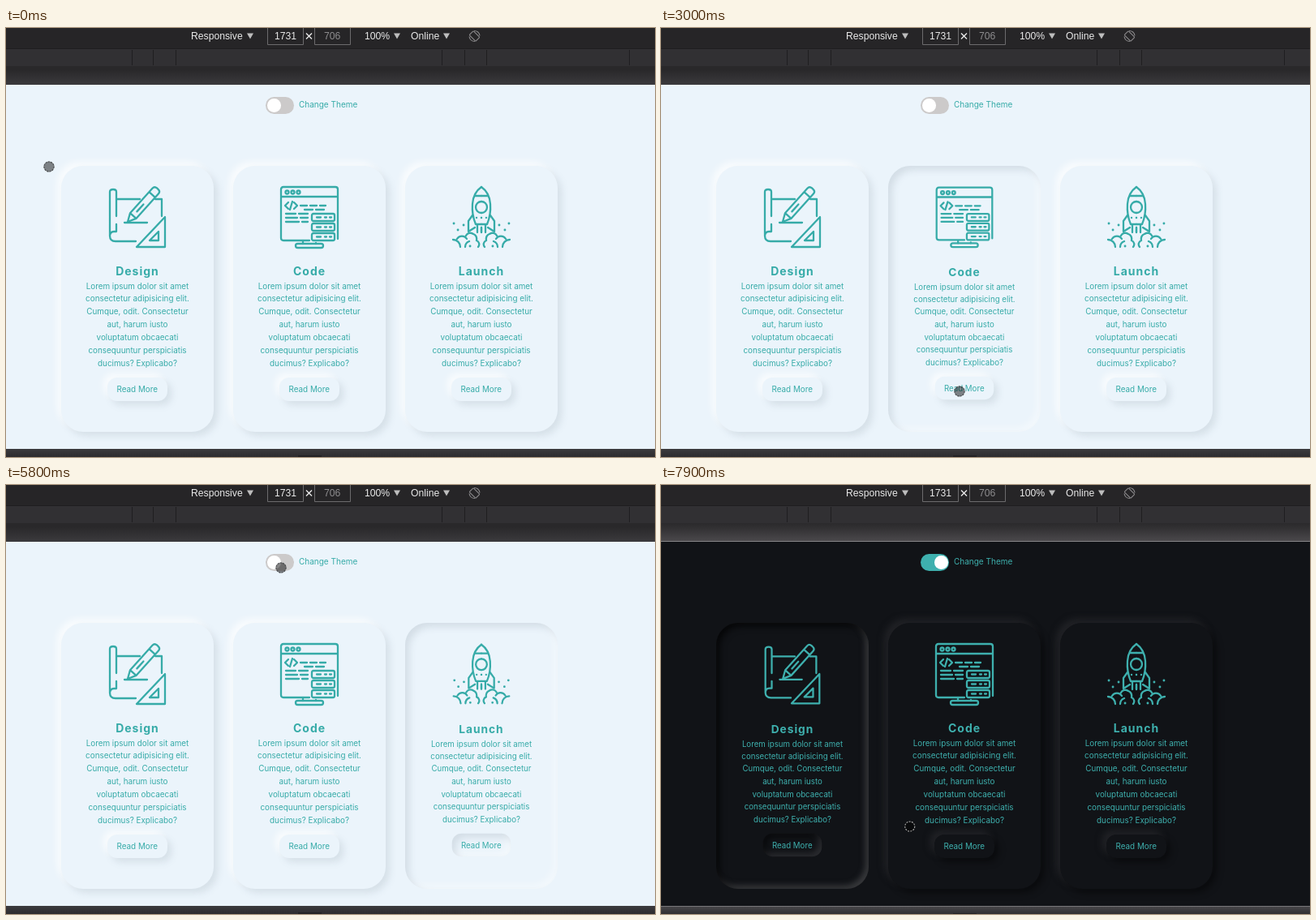
Recreate the animation shown at these times as an HTML page. Size 800 by 529 pixels, loop 8 s.

```html
<!DOCTYPE html>
<html lang="en">
<head>
<meta charset="utf-8">
<title>Theme cards</title>
<style>
html, body { margin: 0; width: 100%; height: 100%; overflow: hidden; background: #29282a; }
#stage {
  --bg: #ebf4fb; --ink: #36aba8; --ring: #4c4e50;
  --out: 5px 5px 9px rgba(110,128,142,.17), -5px -5px 9px rgba(255,255,255,.7);
  --in: inset 5px 5px 9px rgba(110,128,142,.19), inset -5px -5px 9px rgba(255,255,255,.4);
  --press: var(--in);
  position: relative; width: 800px; height: 529px; overflow: hidden;
  font: 9.9px/15.9px Inter, sans-serif; color: var(--ink);
}
#stage.dark {
  --bg: #111317; --ink: #3eb0ae; --ring: #a4a4a4;
  --out: 5px 5px 9px rgba(0,0,0,.4), -5px -5px 9px rgba(50,50,53,.5);
  --in: inset 4px 4px 9px rgba(0,0,0,.7), inset -4px -4px 7px #3a3b3e;
  --press: inset 4px 4px 8px rgba(0,0,0,.45), inset -4px -4px 8px #2b2c30;
}
#stage * { box-sizing: border-box; }
#stage > *, .card > *, .copy > * { position: absolute; }
svg { overflow: visible; }
#bar { left: 0; top: 0; font-family: "Liberation Sans", Arial, sans-serif; }
.edge { left: 0; width: 800px; }
.upper { top: 47px; height: 23px; background: linear-gradient(#29282a, #29282a 20%, #3b3a3d); }
.lower { top: 519px; height: 10px; background: linear-gradient(#3c3b3e, #2d2c2f); }
.lower::after { content: ""; position: absolute; left: 360px; top: 8px; width: 29px; height: 2px; background: #222124; }
.dark .upper { background: linear-gradient(#2b2a2c, #313032 25%, #4a484b); border-bottom: 1px solid #858487; }
.dark .lower { background: linear-gradient(#474649, #302f32); border-top: 1px solid #777679; }
#page { left: 0; top: 70px; width: 800px; height: 449px; background: var(--bg); }
#toggle { left: 320px; top: 84.5px; width: 35px; height: 21.5px; }
#track, #tint { position: absolute; inset: 0; }
#track { border-radius: 11px; }
#knob { position: absolute; left: 2px; top: 2.5px; width: 16.5px; height: 16.5px; border-radius: 50%; background: #fff; }
#tint { background: rgba(50,180,200,.38); }
#label { left: 361px; top: 87px; font-size: 10px; white-space: nowrap; }
.card { top: 170px; width: 188px; height: 327.5px; border-radius: 27px; box-shadow: var(--out); }
.card.on { box-shadow: var(--in); }
.card svg { left: 58px; top: 24px; fill: none; stroke: var(--ink); stroke-width: 2.3; stroke-linecap: round; stroke-linejoin: round; }
.copy { left: 0; top: 118px; width: 188px; height: 172px; text-align: center; }
.on svg, .on .copy { transform: scale(.98); }
h3 { margin: 0; top: 4px; width: 100%; font-size: 14px; letter-spacing: 1px; }
p { margin: 0; top: 22.5px; width: 100%; white-space: pre; }
.btn { left: 57px; top: 143px; width: 73.5px; height: 29px; border-radius: 12px; line-height: 29px; box-shadow: var(--out); }
.btn.pressed { box-shadow: var(--press); }
#cursor { left: -7px; top: -7px; width: 14px; height: 14px; }
</style>
</head>
<body>
<div id="stage">
  <svg id="bar" width="800" height="47" font-size="12.2" fill="#e9e9e9">
    <rect width="800" height="26" fill="#262527"/>
    <rect y="25" width="800" height="22" fill="#313033"/>
    <path d="M0 25.5H800M155.5 27v19M181.5 27v19M209.5 27v19M537.5 27v19M565.5 27v19M592.5 27v19M768.5 27v19" stroke="#1f1e20"/>
    <path d="M322.5-1V20.5H366.5V-1M380.5-1V20.5H424.5V-1" fill="none" stroke="#6c6b6d"/>
    <path d="M297 6.5h8l-4 7zM478 6.5h8l-4 7zM539 6.5h8l-4 7z" fill="#bdbdbd"/>
    <path d="M370 6.5l7 7m0-7l-7 7" stroke="#e9e9e9" stroke-width="1.4"/>
    <text x="228" y="14">Responsive</text>
    <text x="331" y="14">1731</text>
    <text x="392" y="14" fill="#8d8c8e">706</text>
    <text x="442" y="14">100%</text>
    <text x="499" y="14">Online</text>
    <g fill="none" stroke="#8b8a8c" stroke-width="1.1">
      <rect x="574" y="4.5" width="7" height="11" rx="1" transform="rotate(-45 577.5 10)"/>
      <path d="M577 3.5q6 0 7 6M578 16.5q-6 0-7-6"/>
    </g>
  </svg>
  <div class="edge upper"></div>
  <div id="page"></div>
  <div class="edge lower"></div>
  <div id="toggle"><div id="track"></div><div id="knob"></div><div id="tint"></div></div>
  <div id="label">Change Theme</div>
  <svg id="cursor" viewBox="-7 -7 14 14">
    <circle r="6.5" fill="rgba(0,0,0,.47)"/>
    <circle r="6" fill="none" stroke="var(--ring)" stroke-width="1.2" stroke-dasharray="2 1.3"/>
  </svg>
</div>
<script>
const COPY = `Lorem ipsum dolor sit amet
consectetur adipisicing elit.
Cumque, odit. Consectetur
aut, harum iusto
voluptatum obcaecati
consequuntur perspiciatis
ducimus? Explicabo?`;

const repeat = (n, shape) => Array.from({ length: n }, (_, i) => shape(i)).join('');
const mirror = half => `${half}<g transform="matrix(-1 0 0 1 72 0)">${half}</g>`;

const icons = {
  Design: `
    <path d="M10 38V8q0-3-4-3t-4 3V62q0 7 7 7H34M10 48v9H7q-5 0-5 6M10 17H39M58 17h8V38M20 46H48"/>
    <g transform="translate(24 45) rotate(-48)">
      <path d="M0 0l10-5H51q4 0 4 4v2q0 4-4 4H10zM10-5V5M45-5V5M17 0H29"/>
    </g>
    <path d="M70 39V76H35zM62 57V68H51z"/>`,
  Code: `
    <path d="M36 68H4q-3 0-3-3V5q0-3 3-3H68q3 0 3 3V66M1 14H71"/>
    ${repeat(3, i => `<circle cx="${8.5 + 7 * i}" cy="8.5" r="2"/>`)}
    <path d="M10 21l-4 4 4 4M17 21l4 4-4 4M15 20l-3 10"/>
    ${repeat(5, i => `<path d="M${i < 2 ? 25 + 5 * i : 7} ${25 + 5 * i}H${i < 2 ? 56 : 34}" stroke-dasharray="${8 + 2 * i} 4"/>`)}
    ${repeat(3, i => `<g transform="translate(39 ${35 + 12 * i})">
      <rect width="28" height="9" rx="2"/><path d="M6 4.5h5m5 0h2m4 0h2"/></g>`)}
    <path d="M28 69v3M44 71v1"/><rect x="19" y="72" width="34" height="5" rx="2.5"/>`,
  Launch: mirror(`
    <path d="M36 2Q26 9 25 23q-1 13 4 25H36M28 13h8M36 20a7 7 0 0 0 0 14M36 40h.1M30 40h.1"/>
    <path d="M25 37l-5 7v13l8-5M31 49v9M36 52v6"/>
    <path d="M1 67a9 9 0 0 1 9 9M6 66a7 7 0 0 1 12 0M17 62a6 6 0 0 1 9-2q5 2 4 8M21 69q-5 2-5 7M30 68a5 5 0 0 1 2 8"/>
    <path d="M2 47h.1M7 55h.1M14 49h.1M22 75h.1" stroke-width="2.8"/>`)
};

const $ = id => document.getElementById(id);
const stage = $('stage'), cursor = $('cursor');
Object.entries(icons).forEach(([title, icon], i) => cursor.insertAdjacentHTML('beforebegin', `
  <div class="card" style="left:${68 + 212 * i}px">
    <svg width="72" height="78" viewBox="0 0 72 78">${icon}</svg>
    <div class="copy"><h3>${title}</h3><p>${COPY}</p><div class="btn">Read More</div></div>
  </div>`));
const cardEls = [...document.querySelectorAll('.card')];
const buttons = [...document.querySelectorAll('.btn')];

const LOOP = 8000, STEP = 100, THEME_AT = 5900, PRESS_DELAY = 1000;
const home = { x: 53, y: 171 };
const moves = [
  { from: 500, to: 1900, x: 178, y: 438 },
  { from: 2300, to: 3000, x: 368, y: 448 },
  { from: 3200, to: 4000, x: 569, y: 369 },
  { from: 4100, to: 4600, x: 586, y: 443 },
  { from: 5000, to: 5800, x: 339, y: 102 },
  { from: 6000, to: 6600, x: 162, y: 230 },
  { from: 6800, to: 7500, x: 166, y: 444 },
  { from: 7700, to: 8000, x: 356, y: 413 }
];
const visits = [
  { card: 0, at: 1100 }, { card: 1, at: 2700 }, { card: 2, at: 3700 },
  { card: -1, at: THEME_AT }, { card: 0, at: 6600 }
];

const ease = v => v * v * (3 - 2 * v);
const mix = (a, b, v) => a + (b - a) * v;
const progress = (t, from, to) => ease(Math.max(0, Math.min(1, (t - from) / (to - from))));

const cursorAt = t => moves.reduce((p, m) => {
  const v = progress(t, m.from, m.to);
  return { x: mix(p.x, m.x, v), y: mix(p.y, m.y, v) };
}, home);

function draw(t) {
  const { x, y } = cursorAt(t);
  cursor.style.transform = `translate(${x}px, ${y}px)`;
  stage.classList.toggle('dark', t >= THEME_AT);

  const slide = progress(t, THEME_AT - 40, THEME_AT + 360);
  $('knob').style.transform = `translateX(${15 * slide}px)`;
  $('track').style.background = `color-mix(in srgb, #3eb0ae ${100 * slide}%, #cccaca)`;
  $('tint').style.opacity = t >= THEME_AT && t < THEME_AT + 300 ? 1 : 0;

  const visit = visits.findLast(v => t >= v.at);
  cardEls.forEach((el, i) => {
    const on = visit?.card === i;
    el.classList.toggle('on', on);
    buttons[i].classList.toggle('pressed', on && t >= visit.at + PRESS_DELAY);
  });
}

const start = performance.now();
function tick() {
  const t = (performance.now() - start) % LOOP;
  draw(Math.floor(t / STEP) * STEP);
  requestAnimationFrame(tick);
}
tick();
</script>
</body>
</html>
```
